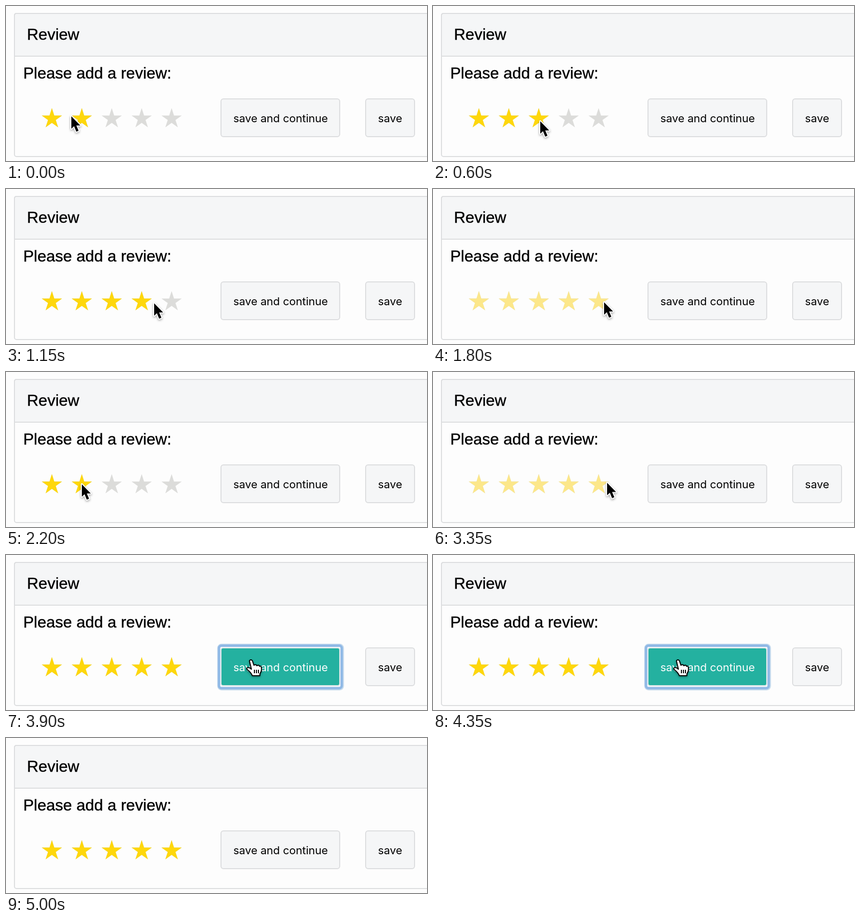
Animation, 844 px wide and 312 px high, one loop 5.05 s. Source, as an HTML page:

```html
<!DOCTYPE html>
<html lang="en">
<head>
<meta charset="utf-8">
<title>Review</title>
<style>
  html, body { margin: 0; width: 100%; height: 100%; overflow: hidden; background: #fdfdfd; }
  svg { position: absolute; left: 0; top: 0; display: block; }
  .heading { font: 32px "Liberation Sans", Arial, sans-serif; stroke: #000; stroke-width: .4; }
  .label { font: 22px Inter, sans-serif; text-anchor: middle; }
  .box { fill: #f5f6f7; stroke: #dcdddf; stroke-width: 2; }

  .lit, .lit svg, .hot, .ring, .arrow, .beam, .hand {
    animation: 5050ms step-end infinite;
  }
  .lit { position: absolute; left: 0; top: 0; height: 312px; overflow: hidden; animation-name: rating; }
  .lit svg { animation-name: tint; }
  .hot { animation-name: hover; }
  .ring { animation-name: focus; }
  .arrow { animation-name: arrow; }
  .beam { animation-name: beam; }
  .hand { animation-name: hover; }
  .cursor { animation: move 5050ms ease-in-out infinite; filter: drop-shadow(0 2px 2px #0005); }

  @keyframes rating {
    0% { width: 182px; }
    6.93% { width: 242px; }
    16.04% { width: 302px; }
    23.96% { width: 362px; }
    40% { width: 302px; }
    41.19% { width: 242px; }
    42.38% { width: 182px; }
    59.21%, 100% { width: 362px; }
  }
  @keyframes tint {
    0%, 40%, 59.21%, 76.04%, 100% { fill: #fed70c; }
    30.69%, 44.55%, 64.36% { fill: #fce78a; }
  }
  @keyframes hover {
    0%, 90.5%, 100% { opacity: 0; }
    72.08% { opacity: 1; }
  }
  @keyframes focus {
    0%, 90.5%, 100% { opacity: 0; }
    76.04% { opacity: 1; }
  }
  @keyframes arrow {
    0%, 57.43%, 90.5% { opacity: 1; }
    49.5%, 72.08%, 93.07%, 100% { opacity: 0; }
  }
  @keyframes beam {
    0%, 57.43%, 100% { opacity: 0; }
    49.5% { opacity: 1; }
  }
  @keyframes move {
    0% { transform: translate(131px, 222px); }
    11.88% { transform: translate(215px, 232px); }
    22.77% { transform: translate(297px, 230px); }
    28.71% { transform: translate(340px, 228px); }
    35.64%, 38.61% { transform: translate(343px, 228px); }
    43.56%, 46.53% { transform: translate(152px, 226px); }
    51.49% { transform: translate(181px, 150px); }
    54.46% { transform: translate(185px, 148px); }
    61.39% { transform: translate(345px, 215px); }
    66.34%, 69.31% { transform: translate(349px, 223px); }
    74.26% { transform: translate(490px, 210px); }
    77.23%, 88.12% { transform: translate(491px, 211px); }
    92.08%, 100% { transform: translate(560px, 270px); }
  }
</style>
</head>
<body>
<svg width="844" height="312">
  <rect x="17" y="15" width="900" height="288" rx="4" fill="#fdfdfd" stroke="#dcdddf" stroke-width="2"/>
  <path class="box" d="M17 101V19q0-4 4-4H900V101Z"/>
  <text class="heading" x="42" y="68">Review</text>
  <text class="heading" x="34.5" y="146">Please add a review:</text>
  <g class="stars" fill="#dcdcda"></g>

  <rect class="box" x="431" y="187" width="238" height="76" rx="5"/>
  <text class="label" x="550.5" y="234">save and continue</text>
  <rect class="box" x="721" y="187" width="98" height="76" rx="5"/>
  <text class="label" x="770" y="234">save</text>

  <g class="hot">
    <rect x="430" y="186" width="240" height="78" rx="5" fill="#e0e8ea"/>
    <rect x="432" y="188" width="236" height="74" rx="3" fill="#24b1a0"/>
    <text class="label" x="550.5" y="234" fill="#fdfdfd">save and continue</text>
  </g>
  <g class="ring" fill="none">
    <rect x="426" y="181" width="249" height="89" rx="6" stroke="#c8dcee" stroke-width="5"/>
    <rect x="427" y="182.5" width="246" height="85.5" rx="5" stroke="#90b9e6" stroke-width="5"/>
  </g>
</svg>

<div class="lit"><svg width="844" height="312"><g class="stars"></g></svg></div>

<svg width="844" height="312">
  <g class="cursor">
    <path class="arrow" d="M0 0V25L5.5 20L10 31L14.5 29L10 18.5H18Z" stroke="#fff" stroke-width="4" stroke-linejoin="round" paint-order="stroke"/>
    <g class="beam" fill="none">
      <path id="beam" d="M-7-15Q0-15 0-11Q0-15 7-15M0-11V11M-7 15Q0 15 0 11Q0 15 7 15M-4 3H4"/>
      <use href="#beam" stroke="#fff" stroke-width="4"/>
      <use href="#beam" stroke="#000" stroke-width="2"/>
    </g>
    <g class="hand" stroke="#000" stroke-width="2" stroke-linejoin="round">
      <path fill="#fff" d="M-3 2Q0-2 3 2L6 11Q10 8 12 12Q16 9 17 13Q21 11 21 17Q22 23 18 28V32H3Q0 25-8 19Q-9 14-3 16L1 19Z"/>
      <path d="M7 20V27M11 20V27M15 20V27"/>
    </g>
  </g>
</svg>

<script>
  const starPath = (cx, cy, radius) => "M" + Array.from({ length: 10 }, (_, i) => {
    const r = i % 2 ? radius * 0.382 : radius;
    const angle = (i / 5 - 0.5) * Math.PI;
    return `${cx + r * Math.cos(angle)} ${cy + r * Math.sin(angle)}`;
  }).join("L") + "Z";

  for (const row of document.querySelectorAll(".stars")) {
    for (let i = 0; i < 5; i++) {
      const star = document.createElementNS(row.namespaceURI, "path");
      star.setAttribute("d", starPath(92 + 60 * i, 227, 21.4));
      row.append(star);
    }
  }
</script>
</body>
</html>
```
